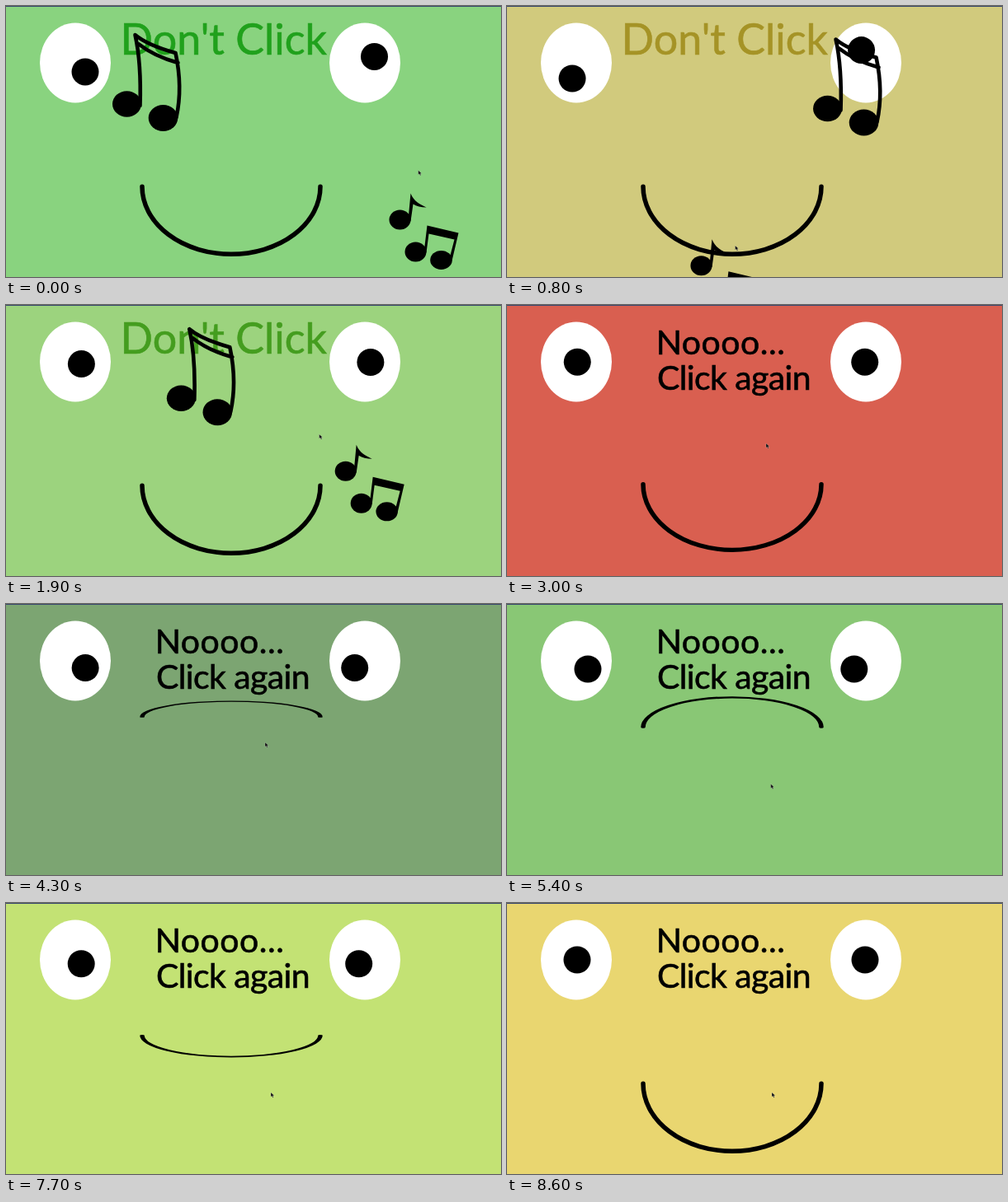
Animation of 600x329 px, one loop 8700 ms. Source, as an HTML page:

```html
<!DOCTYPE html>
<html lang="en">
<head>
<meta charset="utf-8">
<title>Don't Click</title>
<style>
  html, body { margin: 0; width: 100%; height: 100%; overflow: hidden; }
  svg { display: block; width: 100%; height: 100%; }
  text { font-family: Lato, "Open Sans", sans-serif; stroke-width: .6; }
  .line { fill: none; stroke: #000; stroke-linecap: round; stroke-linejoin: round; }
</style>
</head>
<body>
<svg viewBox="0 0 600 329" preserveAspectRatio="none">
  <rect id="bg" width="600" height="329"/>
  <rect width="600" height="1" fill="#3b4a70"/>
  <text id="warn" x="138.500" y="59" font-size="52">Don't Click</text>
  <g id="again" font-size="41" stroke="#000">
    <text x="180.700" y="60" letter-spacing=".5">Noooo...</text>
    <text x="182" y="103" letter-spacing="-.6">Click again</text>
  </g>
  <g fill="#fff">
    <ellipse cx="84" cy="69" rx="43" ry="48.5"/>
    <ellipse cx="435" cy="69" rx="43" ry="48.5"/>
  </g>
  <circle id="left" r="16.5"/>
  <circle id="right" r="16.5"/>
  <path id="mouth" class="line" stroke-width="5.5" d="M165 219.300A108 82 0 0 0 381 219.300"/>
  <g id="big">
    <ellipse cx="147" cy="119" rx="17.5" ry="15.7"/>
    <ellipse cx="191" cy="136" rx="17.8" ry="16"/>
    <path class="line" stroke-width="4.6" d="M163 121C164 90 163 62 157 35C170 46 188 52 206 57C212 85 212 112 207 135M161 46Q180 61 209 69"/>
  </g>
  <g id="small">
    <ellipse cx="477" cy="260" rx="13" ry="12"/>
    <path d="M487 260L490 228C494 238 501 241 509 245Q499 245 493 241L490 262Z"/>
    <ellipse cx="496" cy="299" rx="13" ry="12"/>
    <ellipse cx="527" cy="309" rx="13.3" ry="11.5"/>
    <path d="M506 300L510 267L548 276L540 310L536.500 309L543 284L512 277L509 300Z"/>
  </g>
  <path id="cursor" d="M0 0L0 5.300L1.300 4.200L2.300 6.300L3.300 5.900L2.400 3.900L4 3.700Z" fill="#111" stroke="#fff" stroke-opacity=".5" stroke-width=".4"/>
</svg>
<script>
const LOOP = 8700, CLICK = 3000, LAG = 70;
const el = id => document.getElementById(id);
const [bg, warn, again, left, right, mouth, big, small, cursor] =
  ["bg", "warn", "again", "left", "right", "mouth", "big", "small", "cursor"].map(el);

// time, x, y of the pointer
const pointer = [
  [-140, 430, 275], [-70, 474, 244], [0, 500, 203], [200, 400, 112],
  [400, 230, 125], [570, 172, 225], [730, 232, 299], [800, 276, 294],
  [1000, 390, 275], [1250, 475, 248], [1550, 490, 220], [1830, 409, 186],
  [1900, 380, 160], [2050, 334, 162], [2220, 315, 171]
];
// time, r, g, b after the click
const mood = [[3000, 217, 95, 80], [4300, 124, 165, 114], [6700, 152, 240, 120], [8600, 233, 214, 112]];

const clamp = (v, lo = 0, hi = 1) => Math.min(hi, Math.max(lo, v));
const sine = p => (1 - Math.cos(Math.PI * clamp(p))) / 2;
const rgb = c => `rgb(${c.map(v => Math.round(clamp(v, 0, 255)))})`;
const move = (node, x, y) => node.setAttribute("transform", `translate(${x} ${y})`);
const show = (node, on) => node.setAttribute("visibility", on ? "visible" : "hidden");

function segment(keys, t) {
  let i = 0;
  while (i < keys.length - 2 && t >= keys[i + 1][0]) i++;
  const a = keys[i], b = keys[i + 1];
  return [i, clamp((t - a[0]) / (b[0] - a[0]))];
}

function linear(keys, t) {
  const [i, p] = segment(keys, t);
  return keys[i].slice(1).map((v, k) => v + (keys[i + 1][k + 1] - v) * p);
}

// Hermite curve with slopes taken from the neighbouring points
function curve(keys, t) {
  const [i, p] = segment(keys, t), last = keys.length - 1;
  const span = keys[i + 1][0] - keys[i][0];
  const slope = (j, k) => {
    if (j === 0 || j === last) return 0;
    const a = keys[j - 1], b = keys[j + 1];
    return (b[k] - a[k]) / (b[0] - a[0]) * span;
  };
  const p2 = p * p, p3 = p2 * p, h = 3 * p2 - 2 * p3;
  return [1, 2].map(k => keys[i][k] * (1 - h) + keys[i + 1][k] * h
    + slope(i, k) * (p3 - 2 * p2 + p) + slope(i + 1, k) * (p3 - p2));
}

function setMouth(frown) {
  const y = 259 - 127 * frown - 212 * frown * frown * (1 - frown);
  mouth.setAttribute("transform", `translate(0 ${y}) scale(1 ${1 - 1.44 * frown}) translate(0 -259)`);
}

function follow(t) {
  const [mx, my] = curve(pointer, t);
  const [x, y] = curve(pointer, t - LAG);
  const dx = x - 474, dy = y - 244;
  const ink = rgb([32 - .55 * dx, 161 + .06 * dx, 28 - .04 * dx]);
  bg.setAttribute("fill", rgb([137 - .297 * dx, 211 - .05 * Math.max(0, 409 - x), 127 + .008 * dx]));
  warn.setAttribute("fill", ink);
  warn.setAttribute("stroke", ink);
  move(big, -dx, .1 * dy);
  move(small, dx, dy);
  move(left, 84 + .07 * (x - 303), 69 + .145 * (y - 168));
  move(right, 434.5 + .07 * (x - 303), 72 - .14 * (y - 168));
  move(cursor, mx, my - 3);
  setMouth(0);
}

function sulk(t) {
  const down = sine(Math.pow(clamp((t - 2900) / 2000), .8));
  const frown = down * (1 - sine((t - 6800) / 1750));
  bg.setAttribute("fill", rgb(linear(mood, t)));
  move(left, 85 + 13 * frown, 69 + 10 * frown);
  move(right, 434 - 13.2 * frown, 69 + 10 * frown);
  const shift = sine((t - 4900) / 700);
  move(cursor, 314 + 7 * shift, 168 + 62 * shift);
  setMouth(frown);
}

function draw(t) {
  const clicked = t >= CLICK;
  [warn, big, small].forEach(node => show(node, !clicked));
  show(again, clicked);
  (clicked ? sulk : follow)(t);
}

const start = performance.now();
function tick() {
  draw((performance.now() - start) % LOOP);
  requestAnimationFrame(tick);
}
tick();
</script>
</body>
</html>
```
